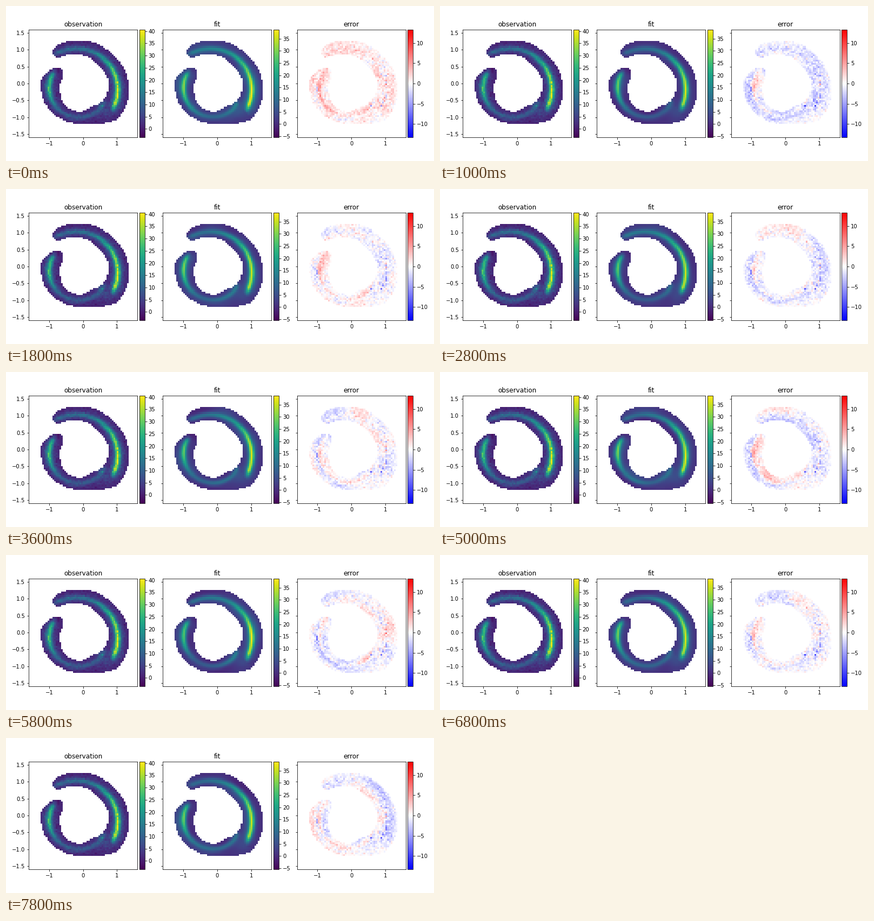
Animation, 792 px wide and 288 px high, one loop 8 s. Source, as a matplotlib script:

```python
import numpy as np
import matplotlib.pyplot as plt
from matplotlib.animation import FuncAnimation

W, H, DPI = 792, 288, 72
N, HALF, FRAMES = 64, 1.6, 40
LEFT, PITCH, TOP, SIDE = 42.2, 248.28, 43.6, 200.8

# Sky grid, row 0 at the bottom
axis = (np.arange(N) + 0.5) * 2 * HALF / N - HALF
X, Y = np.meshgrid(axis, axis)
R = np.hypot(X, Y)
DEG = np.degrees(np.arctan2(Y, X))
DEG_A = (DEG + 60) % 360 - 60
DEG_B = DEG % 360


def bell(d, width):
    return np.exp(-0.5 * (d / width) ** 2)


def window(angle, lo, hi, soft=12):
    return (np.clip((angle - lo) / soft, 0, 1)
            * np.clip((hi - angle) / soft, 0, 1))


def visible_region():
    """Discs of changing size, strung along an open ring."""
    keys = [-197, -180, -155, -130, -92, -70, -45, -20, 20, 45, 90, 128]
    radius = [0.835, 0.96, 1.01, 1.05, 1.02, 0.99, 1.12, 1.09, 1.0, 0.945, 1.05, 1.18]
    size = [0.22, 0.28, 0.26, 0.20, 0.175, 0.25, 0.34, 0.32, 0.275, 0.265, 0.215, 0.175]
    deg = np.linspace(keys[0], keys[-1], 240)
    rad, r = np.radians(deg), np.interp(deg, keys, radius)
    dist = np.hypot(X[..., None] - r * np.cos(rad), Y[..., None] - r * np.sin(rad))
    return (dist < np.interp(deg, keys, size)).any(axis=-1)


# Two overlapping arcs: radius and brightness along the angle
R_A = 0.95 + 0.2 * ((DEG_A - 45) / 82) ** 2
R_B = 1.055 - 0.16 * ((DEG_B - 228) / 75) ** 2
I_A = (11 + 25 * bell(DEG_A + 12, 42)) * window(DEG_A, -46, 140)
I_B = (9 + 19 * bell(DEG_B - 184, 20)) * window(DEG_B, 152, 325)


def arc(radius, level):
    d = R - radius
    return level * (0.77 * bell(d, 0.052) + 0.23 * bell(d, 0.14))


def sky(shift=0.0, gain=1.0):
    blob = 4 * bell(np.hypot(X - 0.75, Y + 0.8), 0.2)
    return 0.6 + arc(R_A, I_A) + gain * arc(R_B + shift, I_B) + blob


MASK = visible_region()
clean = sky()
noise = np.random.default_rng(7).normal(size=(N, N))
obs = clean + noise * (0.75 + 0.045 * clean)
for sx in (0.868, 0.565):
    i, j = (int((v + HALF) / (2 * HALF) * N) for v in (-0.70, sx))
    obs[i, j] = clean[i, j] + 7.5
base = sky(-0.01, 1.06)

# Inside, along and outside the ridge
RIDGE = np.where((DEG_A > -45) & (DEG_A < 145), R_A, R_B)
BANDS = [bell(R - RIDGE - off, w)
         for off, w in [(-0.16, 0.08), (0, 0.05), (0.16, 0.09)]]


def fit_at(k):
    """One random draw of the fit; its overall level settles over time."""
    rng = np.random.default_rng(100 + k)
    bias = -0.5 + 1.7 * np.cos(2 * np.pi * k / 10) * np.exp(-k / 8)
    out = base.copy()
    for band in BANDS:
        level = bias
        for m in range(1, 8):
            phase = rng.uniform(0, 2 * np.pi)
            level = level + 0.9 * rng.normal() / np.sqrt(m) * np.cos(
                np.radians(m * DEG) + phase)
        out += band * level
    return out


def shown(data):
    return np.where(MASK, data, np.nan)


def place(x, width):
    return fig.add_axes([x / W, 1 - (TOP + SIDE) / H, width / W, SIDE / H])


def panel(i, title, data, cmap, lo, hi, step=5):
    x = LEFT + i * PITCH
    ax = place(x, SIDE)
    im = ax.imshow(shown(data), cmap=cmap, vmin=lo, vmax=hi, origin="lower",
                   extent=[-HALF, HALF, -HALF, HALF], aspect="auto",
                   interpolation="nearest")
    ax.set_title(title)
    ax.set_xticks([-1, 0, 1])
    ax.set_yticks(np.arange(-1.5, 1.6, 0.5))
    ax.tick_params(labelleft=i == 0)
    bar = fig.colorbar(im, cax=place(x + SIDE + 3.6, SIDE / 20))
    bar.set_ticks(np.arange(np.ceil(lo / step) * step, hi, step).astype(int))
    return im


plt.rcParams["font.family"] = "DejaVu Sans"
plt.rcParams["font.size"] = 10
fig = plt.figure(figsize=(W / DPI, H / DPI), dpi=DPI, facecolor="white")
first = fit_at(0)
panel(0, "observation", obs, "viridis", -3.54, 40.7)
fit_im = panel(1, "fit", first, "viridis", -5.54, 38.8)
err_im = panel(2, "error", first - obs, "bwr", -13.3, 13.3)


def update(k):
    fit = fit_at(k)
    fit_im.set_data(shown(fit))
    err_im.set_data(shown(fit - obs))
    return fit_im, err_im


anim = FuncAnimation(fig, update, frames=FRAMES, interval=200,
                     repeat=True, repeat_delay=0, blit=False)
plt.show()
```
